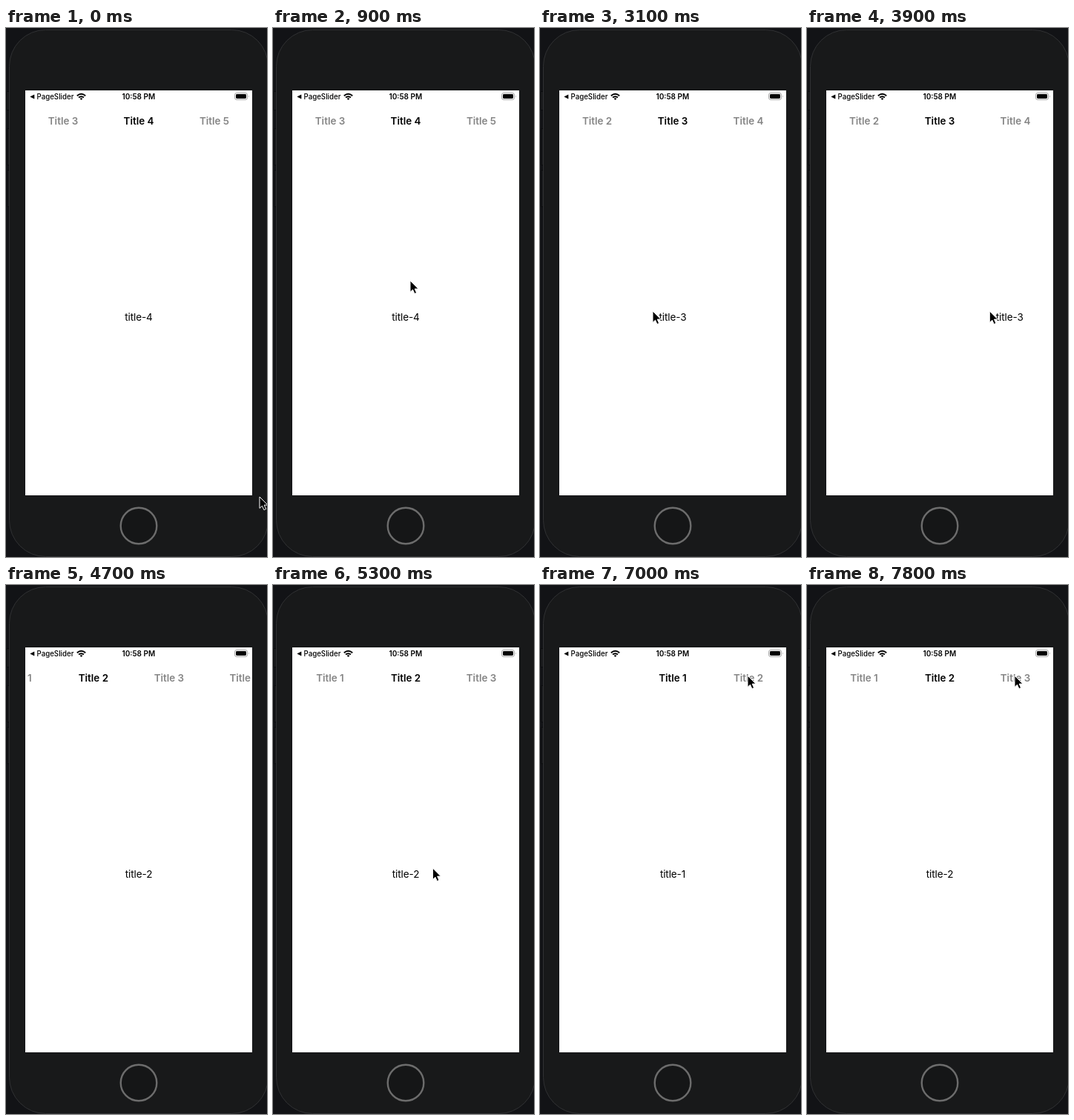
An HTML page that plays this animation: 352 px wide and 712 px high, repeating every 8 s.

```html
<!DOCTYPE html>
<html lang="en">
<head>
<meta charset="utf-8">
<title>Page slider</title>
<style>
  html, body { margin: 0; width: 100%; height: 100%; overflow: hidden; background: #121316; }
  svg { display: block; font-family: Inter, "Noto Sans", sans-serif; }
  .status { font-size: 10px; font-weight: 600; }
  .tab { font-size: 13.4px; font-weight: 600; fill: #858585; text-anchor: middle; }
  .tab.active { fill: #000; }
  .page { font-size: 13.5px; letter-spacing: -.1px; text-anchor: middle; }
</style>
</head>
<body>
<svg width="352" height="712" viewBox="0 0 352 712">
  <defs><clipPath id="screen"><rect x="26" y="84" width="306" height="545"/></clipPath></defs>
  <g fill="#18191b" stroke="#090a0c">
    <rect x=".5" y="85.5" width="6" height="25" rx="1"/>
    <rect x="1.5" y="135.5" width="5" height="49" rx="1"/>
    <rect x="1.5" y="191.5" width="5" height="49" rx="1"/>
  </g>
  <rect x="4.5" y="2.5" width="349" height="709" rx="49" fill="#18191a" stroke="#303133"/>
  <circle cx="179" cy="670" r="24.3" fill="#151617" stroke="#6c6c6c" stroke-width="2.4"/>
  <rect x="26" y="84" width="306" height="545" fill="#fff"/>

  <g class="status">
    <path d="M32.3 92.5L38.3 89.5V95.5Z"/>
    <text x="41.5" y="96" font-size="9.7" font-weight="500">PageSlider</text>
    <g fill="none" stroke="#000" stroke-width="1.9">
      <path d="M95.8 91.2Q101.5 86.2 107.2 91.2"/>
      <path d="M98 93.6Q101.5 90.7 105 93.6"/>
    </g>
    <path d="M99.6 95Q101.5 93.5 103.4 95L101.5 97Z"/>
    <text x="178.8" y="96" text-anchor="middle">10:58 PM</text>
    <rect x="308.5" y="87.5" width="17" height="9" rx="2.6" fill="none" stroke="#a5a5a5"/>
    <rect x="310" y="89" width="14" height="6" rx="1.4"/>
    <path d="M327 90.5Q328.4 92 327 93.5Z" fill="#999"/>
  </g>

  <g clip-path="url(#screen)">
    <g id="tabs"></g>
    <g id="pages"></g>
  </g>
  <path id="cursor" d="M0 0V15.4L3.5 12.2L5.9 17.6L8.6 16.4L6.2 11.1H11Z" stroke="#fff"/>
</svg>
<script>
const LOOP = 8000, TICK = 100, CENTER = 179, TAB_GAP = 102, PAGE_GAP = 306;
const SETTLE = 200, STRIP_DELAY = 70, STRIP_TIME = 300, FIRST_PAGE = 4;

// Pull is the dragged distance; a tap has none.
const gestures = [
  { start: 1200, release: 1700, x: 190, y: 374, pull: -138, to: 4 },
  { start: 2200, release: 2500, x: 179, y: 376, pull: 160, to: 3 },
  { start: 3100, release: 4500, x: 152, y: 381, pull: 165, to: 2 },
  { start: 5500, release: 5700, x: 190, y: 381, pull: 94, to: 1 },
  { start: 7000, release: 7330, x: 280, y: 122, pull: 0, to: 2 }
];

// The cursor joins the gestures with straight moves through a few stops: [time, x, y].
const route = [
  [0, 342, 631], [550, 182, 282], [900, 185, 340], [1100, 190, 374],
  [5900, 328, 380], [6600, 270, 150],
  ...gestures.flatMap(g => [[g.start, g.x, g.y], [g.release, g.x + g.pull, g.y]])
].sort((a, b) => a[0] - b[0]);

const clamp = u => Math.min(1, Math.max(0, u));
const ease = u => (u = clamp(u), u * u * (3 - 2 * u));
const mix = (a, b, u) => a + (b - a) * u;

function addText(parent, cls, y, text) {
  const el = document.createElementNS("http://www.w3.org/2000/svg", "text");
  el.setAttribute("class", cls);
  el.setAttribute("y", y);
  el.textContent = text;
  return document.getElementById(parent).appendChild(el);
}

const tabs = [], pages = [];
for (let n = 1; n <= 5; n++) {
  tabs.push(addText("tabs", "tab", 130, "Title " + n));
  pages.push(addText("pages", "page", 394, "title-" + n));
}
const cursor = document.getElementById("cursor");

function cursorAt(t) {
  const next = route.findIndex(stop => stop[0] > t);
  if (next < 0) return route.at(-1).slice(1);
  const [t0, x0, y0] = route[next - 1], [t1, x1, y1] = route[next];
  const u = (t - t0) / (t1 - t0);
  return [mix(x0, x1, u), mix(y0, y1, u)];
}

function draw(t) {
  let page = FIRST_PAGE, strip = FIRST_PAGE, active = FIRST_PAGE;
  for (const { start, release, pull, to } of gestures) {
    page -= pull / PAGE_GAP * clamp((t - start) / (release - start));
    page = mix(page, to, ease((t - release) / SETTLE));
    const glide = t - release - STRIP_DELAY;
    strip = mix(strip, to, ease(glide / STRIP_TIME));
    if (glide >= 0) active = to;
  }
  tabs.forEach((tab, i) => {
    tab.setAttribute("x", CENTER + (i + 1 - strip) * TAB_GAP);
    tab.classList.toggle("active", i + 1 === active);
  });
  pages.forEach((el, i) => el.setAttribute("x", CENTER + (i + 1 - page) * PAGE_GAP));
  cursor.setAttribute("transform", `translate(${cursorAt(t)})`);
  cursor.setAttribute("visibility", t > 4500 && t < 4900 ? "hidden" : "visible");
}

function frame() {
  const t = performance.now() % LOOP;
  draw(Math.floor(t / TICK) * TICK);
  requestAnimationFrame(frame);
}
frame();
</script>
</body>
</html>
```
